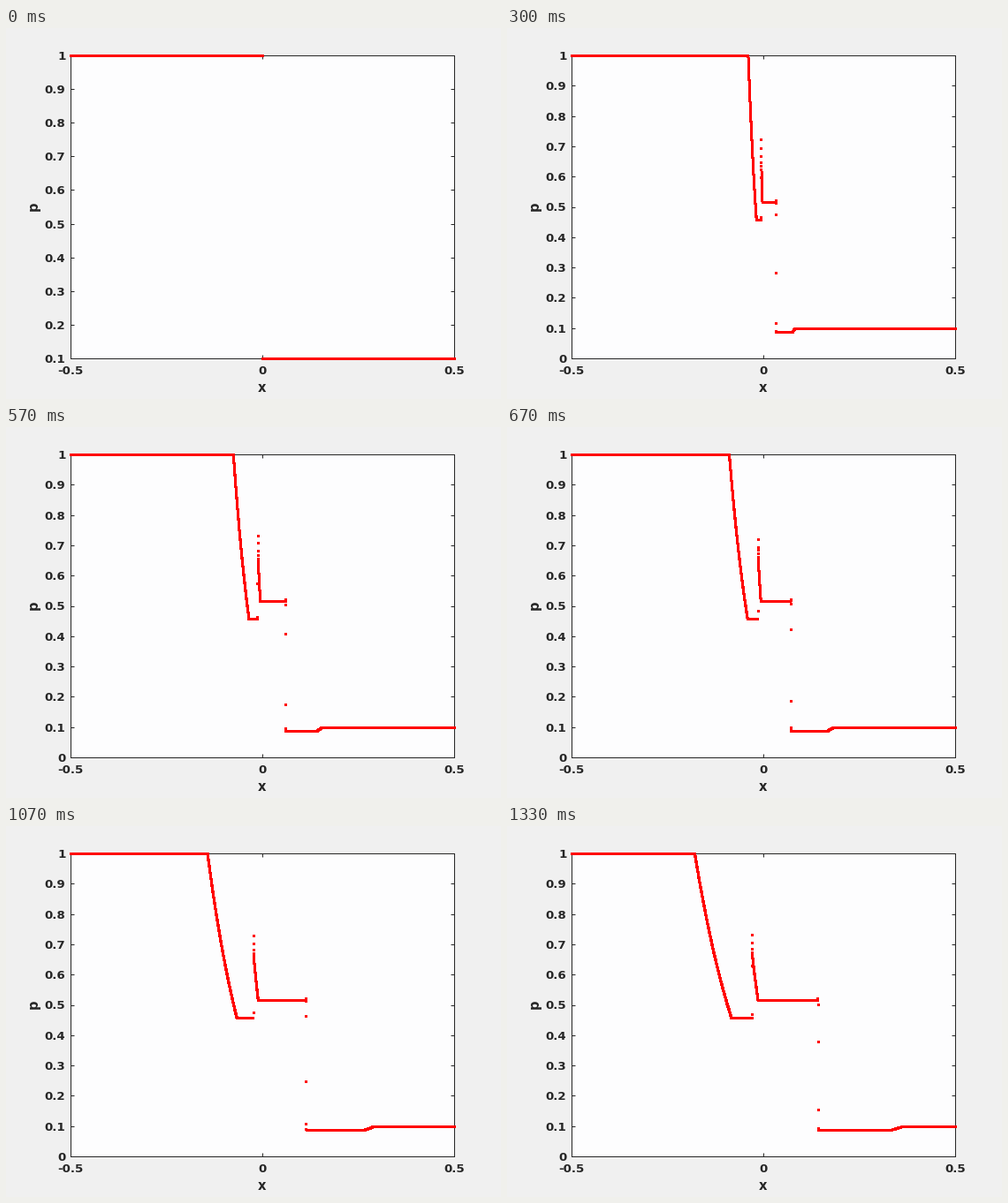
Animation of 560 by 420 pixels, one loop 1.36 s. Source, as a matplotlib script:

```python
import matplotlib.pyplot as plt
import numpy as np
from matplotlib.animation import FuncAnimation

W, H, DPI = 560, 420, 80
PX = 72 / DPI                      # one pixel in points
LEFT, RIGHT, TOP, BOTTOM = 73, 507, 31, 374
CELLS = 7000
INK, PAPER, PLOT, RED = "#262626", "#f0f0f0", "#fdfdfe", "#ff0000"

plt.rcParams.update({"font.family": "DejaVu Sans", "font.weight": "bold"})

# Wave speeds are in pixels per time step
HEAD, TAIL = -1.95, -0.91
SLOW, SLOW_END = -0.327, -0.163
SHOCK = 1.54
FAST, FAST_END = 3.61, 3.95

cells = np.arange(CELLS)
x = (cells + 0.5) / CELLS - 0.5


def fan(xi, start, end, p0, p1):
    """Rarefaction between two speeds, constant outside them."""
    t = np.clip((xi - start) / (end - start), 0, 1)
    a, b = p0 ** (1 / 7), p1 ** (1 / 7)
    return (a + (b - a) * t) ** 7


def logistic(z):
    return 1 / (1 + np.exp(-z))


def offset(xi, speed, phase):
    """Distance from a shock in cells; the phase shifts it within its cell."""
    return np.clip(cells - np.searchsorted(xi, speed) + phase % 1, -12, 12)


def pressure(step):
    if step == 0:
        return np.where(x < 0, 1.0, 0.1)
    xi = x * (RIGHT - LEFT) / step
    p = fan(xi, HEAD, TAIL, 1, 0.457)

    # Slow shock: sharp rise, then a decaying overshoot
    s = offset(xi, SLOW, 0.5 + 0.4875 * step)
    behind = fan(xi, SLOW, SLOW_END, 0.667, 0.517) + 0.237 * np.exp(-s / 1.78)
    p += logistic(3.5 * (s - 1)) * (behind - 0.457)

    # Right-going shock: tiny bump, then a smooth drop
    s = offset(xi, SHOCK, 0.53 + 0.31 * step)
    p += 0.006 * np.exp(-(s + 3) ** 2)
    ahead = fan(xi, FAST, FAST_END, 0.088, 0.1)
    return p + logistic(2.45 * (s - 0.24)) * (ahead - p)


fig = plt.figure(figsize=(W / DPI, H / DPI), dpi=DPI, facecolor=PAPER)
ax = fig.add_axes([LEFT / W, 1 - BOTTOM / H, (RIGHT - LEFT) / W, (BOTTOM - TOP) / H],
                  facecolor=PLOT)
ax.set_xlim(-0.5, 0.5)
ax.set_xticks([-0.5, 0, 0.5], ["-0.5", "0", "0.5"])
ax.tick_params(direction="in", top=True, right=True, length=4.3 * PX, width=PX,
               color=INK, labelcolor=INK, labelsize=13.33 * PX)
ax.tick_params(axis="x", pad=8 * PX)
ax.tick_params(axis="y", pad=5.5 * PX)
for spine in ax.spines.values():
    spine.set(color=INK, linewidth=PX)

label = dict(color=INK, fontsize=14.67 * PX)
fig.text(289.5 / W, 1 - 411.5 / H, "x", ha="center", va="baseline", **label)
fig.text(38.5 / W, 1 - 201.5 / H, "p", ha="right", va="center", rotation=90, **label)

dots, = ax.plot([], [], "s", color=RED, markersize=3 * PX, markeredgewidth=0,
                clip_on=False, zorder=5)


def draw(tick):
    step = (3 * tick + 1) // 10    # 30 steps per second on a 10 ms clock
    low = 1 if step == 0 else 0
    ticks = np.arange(low, 11) / 10
    ax.set_ylim(low / 10, 1)
    ax.set_yticks(ticks, [f"{t:g}" for t in ticks])
    dots.set_data(x, pressure(step))
    return dots,


anim = FuncAnimation(fig, draw, frames=136, interval=10, repeat=True,
                     repeat_delay=0, blit=False)
plt.show()
```
